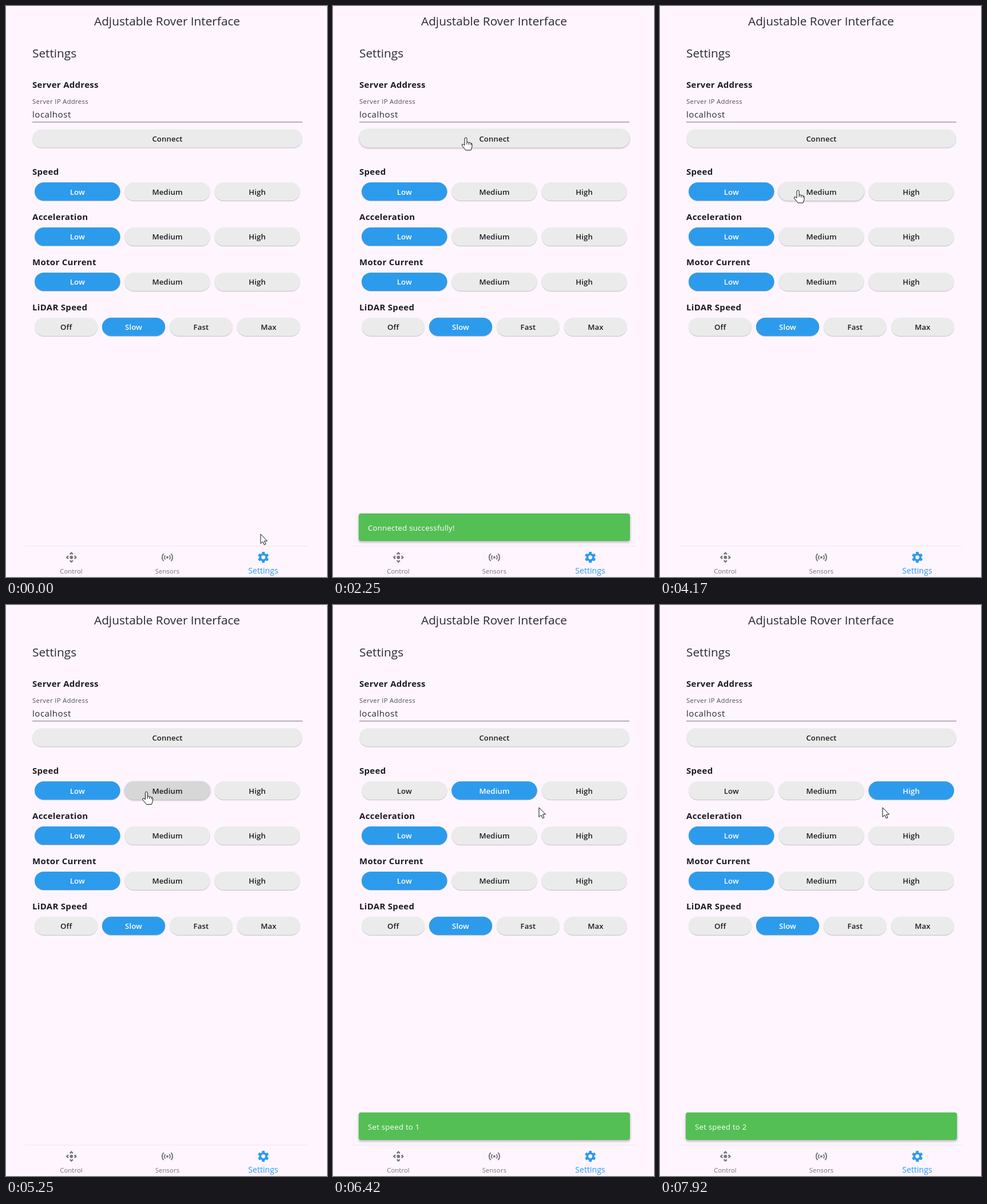
Write an HTML page that moves like this. It is 561x998 px and loops after 8 s.

```html
<!DOCTYPE html>
<html lang="en">
<head>
<meta charset="utf-8">
<title>Settings</title>
<style>
  html, body { margin: 0; width: 100%; height: 100%; overflow: hidden; background: #fef5ff; }
  svg { display: block; width: 561px; height: 998px; font-family: "Open Sans", "Noto Sans", sans-serif; fill: #1d1b20; }
  .middle { text-anchor: middle; }
  .title { font-size: 20.8px; fill: #2b292f; }
  .heading { font-size: 15px; font-weight: 700; letter-spacing: .3px; }
  .hint { font-size: 11.3px; letter-spacing: .35px; fill: #514d57; }
  .value { font-size: 15.1px; letter-spacing: .5px; fill: #2b292f; }
  .button { font-size: 13.2px; font-weight: 600; letter-spacing: .1px; text-anchor: middle; }
  .tab { font-size: 11.3px; letter-spacing: .1px; fill: #757575; }
  .tab.active { font-size: 14px; fill: #2d9bec; }
  .toast { font-size: 13.2px; letter-spacing: .25px; fill: #fff; }
  .toast rect { fill: #54bf54; filter: drop-shadow(0 2px 2px rgba(0, 0, 0, .3)); }
  .cursor { fill: #fff; stroke: #111; stroke-linejoin: round; }
</style>
</head>
<body>
<svg id="stage" viewBox="0 0 561 998">
  <text class="title middle" x="281.5" y="33.7">Adjustable Rover Interface</text>
  <text class="title" x="46" y="90">Settings</text>
  <text class="heading" x="46" y="142.8">Server Address</text>
  <text class="hint" x="46" y="170.5">Server IP Address</text>
  <text class="value" x="46" y="194.5">localhost</text>
  <rect x="46" y="202.4" width="472" height="1" fill="#716c76"/>

  <g id="controls"></g>

  <rect x="32" y="943.5" width="496" height="1" fill="#eee7f2"/>
  <g transform="translate(114.3 963.7) scale(.96)" fill="#757575">
    <circle r="3"/>
    <g id="arrows"></g>
  </g>
  <g transform="translate(282 963.7)" fill="none" stroke="#757575" stroke-width="2">
    <circle r="2" fill="#757575" stroke="none"/>
    <path d="M-3.5 3.5A5 5 0 0 1-3.5-3.5M3.5-3.5A5 5 0 0 1 3.5 3.5M-6.4 6.4A9 9 0 0 1-6.4-6.4M6.4-6.4A9 9 0 0 1 6.4 6.4"/>
  </g>
  <g transform="translate(449.7 963.6)" fill="#2d9bec">
    <circle r="5.3" fill="none" stroke="#2d9bec" stroke-width="3.8"/>
    <g id="teeth"></g>
  </g>
  <text class="tab middle" x="114" y="992.3">Control</text>
  <text class="tab middle" x="282" y="992.3">Sensors</text>
  <text class="tab active middle" x="449.5" y="991.6">Settings</text>

  <g id="toast" class="toast">
    <rect x="45" y="887" width="474" height="48" rx="4"/>
    <text id="message" x="61" y="916.7"></text>
  </g>

  <g id="cursor" class="cursor">
    <path id="arrow" d="M0 0V16.5L3.8 13 6.3 18.8 9 17.6 6.5 12H11.5Z"/>
    <path id="hand" d="M-2 2A2 2 0 0 1 2 2V8.5Q4.5 6.5 5.5 9Q8 7.5 9 10Q11 9 11 12V16L9 22H0L-6.5 14Q-7.5 11-4.5 11.5L-2 13.5ZM2 8.5V12M5.5 9V12.5M9 10V13"/>
  </g>
</svg>
<script>
const LOOP = 8000;
const GRAY = [235, 235, 235], BLUE = [45, 155, 236], DARK = [29, 27, 32], WHITE = [255, 255, 255], BLACK = [0, 0, 0];
const $ = id => document.getElementById(id);
const clamp = v => Math.max(0, Math.min(1, v));
const smooth = v => { v = clamp(v); return v * v * (3 - 2 * v); };
const ramp = (t, start, length) => smooth((t - start) / length);
const mix = (a, b, k) => a.map((v, i) => v + (b[i] - v) * k);
const rgb = c => `rgb(${c.map(Math.round)})`;

function add(parent, tag, attributes, text = "") {
  const node = document.createElementNS("http://www.w3.org/2000/svg", tag);
  for (const name in attributes) node.setAttribute(name, attributes[name]);
  node.textContent = text;
  return parent.appendChild(node);
}

// Icon parts repeated around a centre
for (let i = 0; i < 4; i++)
  add($("arrows"), "path", { d: "M0-10L3.5-6.5 1.8-4.7 0-6.5-1.8-4.7-3.5-6.5Z", transform: `rotate(${i * 90})` });
for (let i = 0; i < 6; i++)
  add($("teeth"), "rect", { x: -2.4, y: -9.6, width: 4.8, height: 4.5, rx: .6, transform: `rotate(${i * 60})` });

const buttons = [];
function addButton(label, x, y, width, isSelected = () => 0) {
  const rect = add($("controls"), "rect", { x, y, width, height: 32, rx: 16 });
  const text = add($("controls"), "text", { class: "button", x: x + width / 2, y: y + 21.3 }, label);
  const button = { x, y, width, rect, text, isSelected, presses: [] };
  buttons.push(button);
  return button;
}

function addRow(index, name, labels, selections) {
  const y = 308.3 + index * 78.8;
  const gap = 7.6, width = (464 - gap * (labels.length - 1)) / labels.length;
  add($("controls"), "text", { class: "heading", x: 46, y: y - 13 }, name);
  return labels.map((label, i) => addButton(label, 50 + i * (width + gap), y, width, selections[i]));
}

const MEDIUM_SET = 5320, HIGH_SET = 7170;
const levels = ["Low", "Medium", "High"];
const always = () => 1;
const toMedium = t => ramp(t, MEDIUM_SET, 180);
const toHigh = t => ramp(t, HIGH_SET, 180);

const connect = addButton("Connect", 46, 215.5, 472);
const [, medium, high] = addRow(0, "Speed", levels, [t => 1 - toMedium(t), t => toMedium(t) - toHigh(t), toHigh]);
addRow(1, "Acceleration", levels, [always]);
addRow(2, "Motor Current", levels, [always]);
addRow(3, "LiDAR Speed", ["Off", "Slow", "Fast", "Max"], [, always]);
connect.presses.push(1270);
medium.presses.push(5110);
high.presses.push(6980);

const toasts = [
  [1540, 2780, "Connected successfully!"],
  [MEDIUM_SET + 20, 6580, "Set speed to 1"],
  [HIGH_SET + 20, 9000, "Set speed to 2"]
];

// Pointer stops: time, x, y
const stops = [
  [0, 445, 923], [120, 445, 923], [950, 231, 264], [1200, 225, 225], [1500, 225, 225],
  [2150, 232, 230], [2550, 232, 230], [2950, 231.5, 268], [3550, 231.5, 268],
  [4100, 241, 322], [4900, 245, 326], [5650, 246, 327], [6250, 360, 354],
  [6680, 360, 354], [6950, 388, 328], [7560, 389, 328], [7850, 389, 354], [LOOP, 389, 354]
];

function pointerAt(t) {
  const next = stops.findIndex(stop => stop[0] > t);
  const [start, ...from] = stops[next - 1], [end, ...to] = stops[next];
  return mix(from, to, ramp(t, start, end - start));
}

function draw(t) {
  const [px, py] = pointerAt(t);
  let overButton = false;
  for (const b of buttons) {
    const hover = px > b.x && px < b.x + b.width && py > b.y && py < b.y + 32;
    overButton ||= hover;
    const press = b.presses.reduce((sum, at) => sum + ramp(t, at, 120) - ramp(t, at + 260, 260), 0);
    const selected = b.isSelected(t);
    b.rect.style.fill = rgb(mix(mix(GRAY, BLUE, selected), BLACK, press * .085));
    b.rect.style.filter = hover
      ? "drop-shadow(0 1.5px 1.5px rgba(0,0,0,.32))"
      : "drop-shadow(0 1px .7px rgba(0,0,0,.22))";
    b.text.style.fill = rgb(mix(DARK, WHITE, selected));
  }

  const toast = toasts.find(([start, end]) => t >= start && t < end + 120);
  $("toast").style.opacity = toast ? ramp(t, toast[0], 160) - ramp(t, toast[1], 120) : 0;
  $("message").textContent = toast ? toast[2] : "";

  $("cursor").setAttribute("transform", `translate(${px} ${py})`);
  $("arrow").style.display = overButton ? "none" : "";
  $("hand").style.display = overButton ? "" : "none";
}

function tick() {
  draw(performance.now() % LOOP);
  requestAnimationFrame(tick);
}
tick();
</script>
</body>
</html>
```
